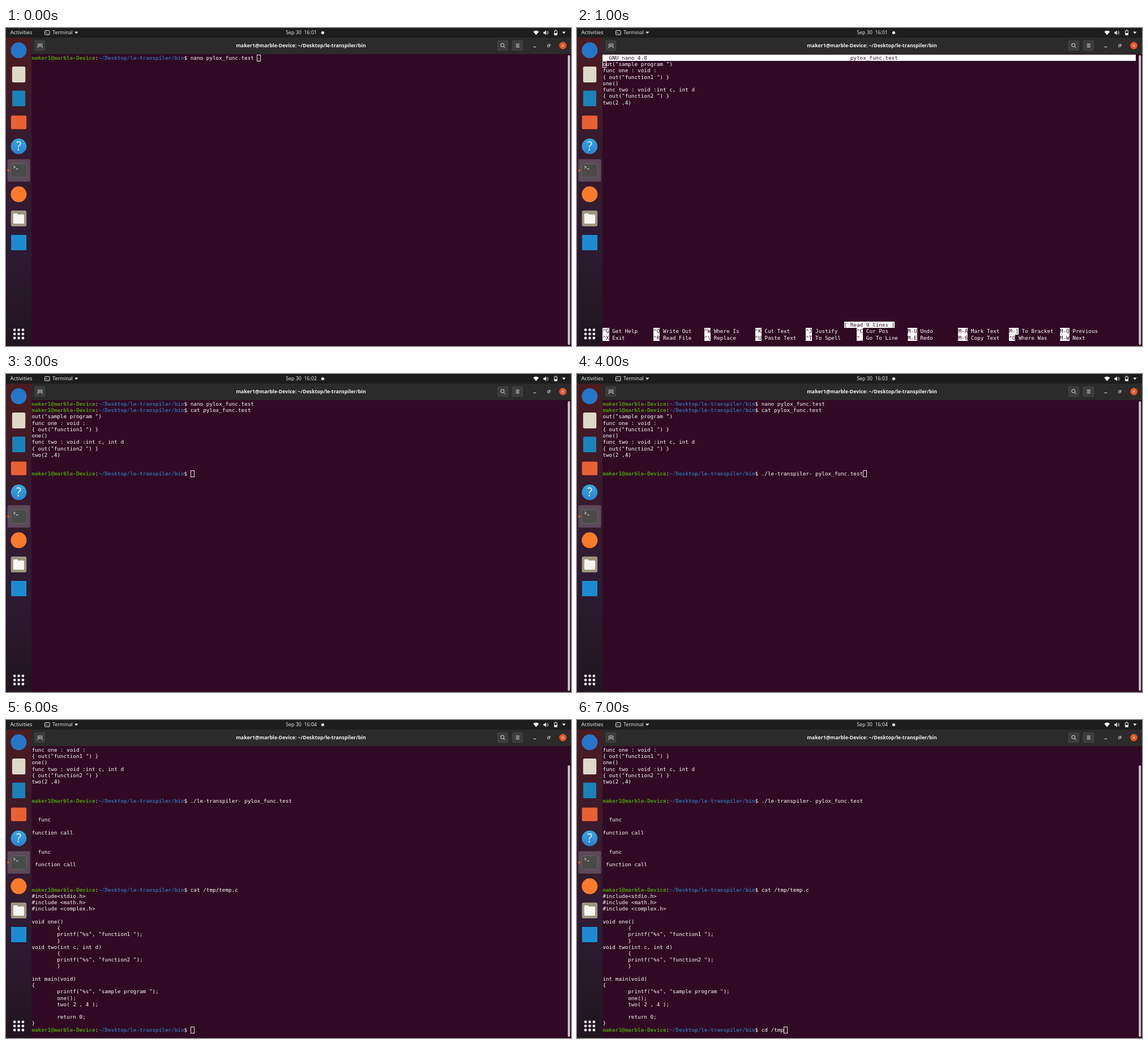
An HTML page that plays this animation: 998x561 px, repeating every 8 s.

```html
<!DOCTYPE html>
<html lang="en">
<head>
<meta charset="utf-8">
<title>Terminal session</title>
<style>
  html, body { margin: 0; width: 100%; height: 100%; overflow: hidden; background: #300a24; }
  svg { position: absolute; left: 0; top: 0; }
  text { font-family: "Open Sans", "Noto Sans", sans-serif; fill: #f2f2f2; white-space: pre; }
  .line { fill: none; stroke: #e6e6e6; }
  #screen {
    position: absolute; left: 44.4px; top: 46px; width: 945px; height: 514px;
    margin: 0; padding: 1px; overflow: hidden;
    font: 9.32px/11.22px "DejaVu Sans Mono", monospace; color: #fff;
  }
  #screen .user { color: #4e9a06; }
  #screen .path { color: #3465a4; }
  #screen i { font-style: normal; display: inline-block; vertical-align: top; height: 11.22px; background: #fff; color: #300a24; }
  #screen u { position: relative; display: inline-block; vertical-align: top; height: 11.22px; text-decoration: none; }
  #screen u::after {
    content: ""; position: absolute; left: 0; top: 0;
    box-sizing: border-box; width: 7px; height: 12px; border: 1px solid #f0edef;
  }
</style>
</head>
<body>
<svg width="998" height="561" viewBox="0 0 998 561">
  <defs>
    <linearGradient id="dock" x2="0" y2="1">
      <stop offset="0" stop-color="#4b1c20"/>
      <stop offset=".3" stop-color="#3a1a2c"/>
      <stop offset=".65" stop-color="#2e1b33"/>
      <stop offset="1" stop-color="#21151f"/>
    </linearGradient>
    <linearGradient id="help" x2="0" y2="1">
      <stop offset="0" stop-color="#38a6e2"/>
      <stop offset="1" stop-color="#2c80cf"/>
    </linearGradient>
  </defs>
  <rect width="998" height="561" fill="#300a24"/>
  <rect y="17" width="45" height="544" fill="url(#dock)"/>
  <rect width="998" height="17" fill="#1d1d1d"/>
  <rect x="45" y="17" width="953" height="29" fill="#2b2b2b"/>

  <!-- top bar -->
  <text x="7.5" y="11.4" font-size="9.5">Activities</text>
  <rect class="line" x="68.5" y="4.5" width="8.5" height="7.5" rx="1"/>
  <path class="line" d="M70.3 6.5l1.7 1.5-1.7 1.5M73 10h2.2" stroke-width=".8"/>
  <text x="82" y="11.4" font-size="8.8">Terminal</text>
  <path d="M121 6.5h6.4l-3.2 3.8zM982.2 6.5h6.4l-3.2 3.8z" fill="#f2f2f2"/>
  <text id="clock" x="494.2" y="11.4" font-size="8.85"></text>
  <circle cx="559.4" cy="8.3" r="2.6" fill="#f2f2f2"/>
  <path d="M931.3 6.6q5-4.2 10 0l-5 6z" fill="#f2f2f2"/>
  <path d="M949.3 6.8h1.9l2.6-2.6v8.4l-2.6-2.6h-1.9z" fill="#f2f2f2"/>
  <path class="line" d="M955 6.4q1.4 2 0 4M956.6 5q2.4 3.4 0 6.8" stroke-width=".8"/>
  <path class="line" d="M968.6 4.9h4.8v7.4h-4.8zM970 3.8h2"/>
  <path d="M969 9h4v3h-4z" fill="#f2f2f2"/>

  <!-- window header -->
  <g fill="#3d3d3d" stroke="#232323" stroke-width=".7">
    <rect x="49.5" y="21" width="20.5" height="20" rx="2.5"/>
    <rect x="867" y="21" width="21" height="20" rx="2.5"/>
    <rect x="893" y="21" width="21" height="20" rx="2.5"/>
  </g>
  <path class="line" d="M55.5 34.5h1.2v-6.3h6.8v6.3h1.2M60 29.7v4M58 31.7h4" stroke-width=".9"/>
  <circle class="line" cx="876.8" cy="30.2" r="3"/>
  <path class="line" d="M879 32.5l2.6 2.6M900.8 28.4h6M900.8 31h6M900.8 33.6h6M931.4 33.3h5"/>
  <path class="line" d="M956.5 30h3.3v3.3h-3.3zM957.7 28.8h3.4v3.4" stroke-width=".8"/>
  <circle cx="983.6" cy="31" r="6.4" fill="#e95420"/>
  <path class="line" d="M981.4 28.8l4.4 4.4M985.8 28.8l-4.4 4.4" stroke="#fff"/>
  <text x="521" y="34.2" font-size="8.8" font-weight="700" text-anchor="middle">maker1@marble-Device: ~/Desktop/le-transpiler/bin</text>

  <!-- dock -->
  <rect x="2.5" y="231.5" width="40" height="39.5" rx="2" fill="#fff" fill-opacity=".2"/>
  <circle cx="4" cy="251.3" r="2" fill="#e95420"/>
  <circle cx="22.4" cy="39.3" r="14" fill="#2576c8"/>
  <rect x="10.8" y="68" width="23.4" height="28" rx="2.5" fill="#ded9ca"/>
  <rect x="11" y="110.5" width="23" height="27.5" rx="1.5" fill="#1b82b9"/>
  <rect x="8.8" y="154.5" width="27.4" height="24" rx="2.5" fill="#ea6035"/>
  <circle cx="22.4" cy="208.8" r="13.8" fill="url(#help)"/>
  <text x="22.4" y="216.4" font-size="21" text-anchor="middle">?</text>
  <rect x="8.8" y="239.5" width="27.4" height="24" rx="2.5" fill="#4a4b49" stroke="#686b67" stroke-width=".8"/>
  <path class="line" d="M13 243.3l3.4 2-3.4 2M17.6 248.7h4"/>
  <circle cx="22.4" cy="293.3" r="14" fill="#fb7b2c"/>
  <rect x="8.6" y="322" width="27.6" height="28" rx="3" fill="#9d9480"/>
  <path d="M12.8 328.5q0-1.5 1.5-1.5h5l1.7 2h9.5q1.6 0 1.6 1.6v13q0 1.6-1.6 1.6h-16q-1.7 0-1.7-1.6z" fill="#f7f5f0"/>
  <rect x="9" y="365" width="27" height="27" fill="#1d8bd1"/>
  <path d="M15.1 532.6h15M15.1 539.8h15M15.1 547h15" stroke="#f2f2f2" stroke-width="4.8" stroke-linecap="round" stroke-dasharray="0 7.4"/>

  <rect id="bar" x="992.4" y="48" width="3.8" height="511" rx="1.9" fill="#d4ccd0"/>
</svg>
<pre id="screen"></pre>

<script>
const STEP = 1000;
const $ = id => document.getElementById(id);
const esc = s => s.replace(/&/g, "&amp;").replace(/</g, "&lt;");
const cursor = "<u></u>";
const inv = s => `<i>${esc(s)}</i>`;
const prompt = cmd =>
  `<b class="user">maker1@marble-Device</b>:<b class="path">~/Desktop/le-transpiler/bin</b>$ ${cmd}`;

const program = `out("sample program ")
func one : void :
{ out("function1 ") }
one()
func two : void :int c, int d
{ out("function2 ") }
two(2 ,4)`;

const result = `

  func

function call


  func

 function call


`;

const cCode = esc(`#include<stdio.h>
#include <math.h>
#include <complex.h>

void one()
        {
        printf("%s", "function1 ");
        }
void two(int c, int d)
        {
        printf("%s", "function2 ");
        }

int main(void)
{
        printf("%s", "sample program ");
        one();
        two( 2 , 4 );

        return 0;
}`);

const keys = [
  "^G Get Help|^O Write Out|^W Where Is|^K Cut Text|^J Justify|^C Cur Pos|M-U Undo|M-A Mark Text|M-] To Bracket|M-Q Previous",
  "^X Exit|^R Read File|^\\ Replace|^U Paste Text|^T To Spell|^_ Go To Line|M-E Redo|M-6 Copy Text|^Q Where Was|M-W Next"
];
const keyRow = row => row.split("|").map(item => {
  const n = item.indexOf(" ");
  return inv(item.slice(0, n)) + item.slice(n).padEnd(16 - n);
}).join("");

function nano() {
  const head = ("  GNU nano 4.8".padEnd(78) + "pylox_func.test").padEnd(168);
  return [
    inv(head),
    "<u>o</u>" + program.slice(1),
    "\n".repeat(33),
    " ".repeat(76) + inv("[ Read 9 lines ]"),
    ...keys.map(keyRow)
  ].join("\n");
}

const edit = "nano pylox_func.test", show = "cat pylox_func.test";
const run = "./le-transpiler- pylox_func.test", dump = "cat /tmp/temp.c";
const listed = [prompt(edit), prompt(show), program, "", "", ""].join("\n");
const ran = listed + [prompt(run), result, ""].join("\n");
const dumped = (ran + [prompt(dump), cCode, ""].join("\n")).split("\n").slice(3).join("\n");

// minute, screen text, top of the scrollbar
const steps = [
  [1, prompt(edit + " " + cursor), 48],
  [1, nano(), 48],
  [2, prompt(edit) + "\n" + prompt(show + cursor), 48],
  [2, listed + prompt(cursor), 48],
  [3, listed + prompt(run + cursor), 48],
  [3, ran + prompt(dump + cursor), 48],
  [4, dumped + prompt(cursor), 80],
  [4, dumped + prompt("cd /tmp" + cursor), 80]
];

let shown = -1;
function draw() {
  const n = Math.floor(performance.now() / STEP) % steps.length;
  if (n !== shown) {
    const [minute, text, top] = steps[shown = n];
    $("clock").textContent = `Sep 30  16:0${minute}`;
    $("screen").innerHTML = text;
    $("bar").setAttribute("y", top);
    $("bar").setAttribute("height", 559 - top);
  }
  requestAnimationFrame(draw);
}
draw();
</script>
</body>
</html>
```
